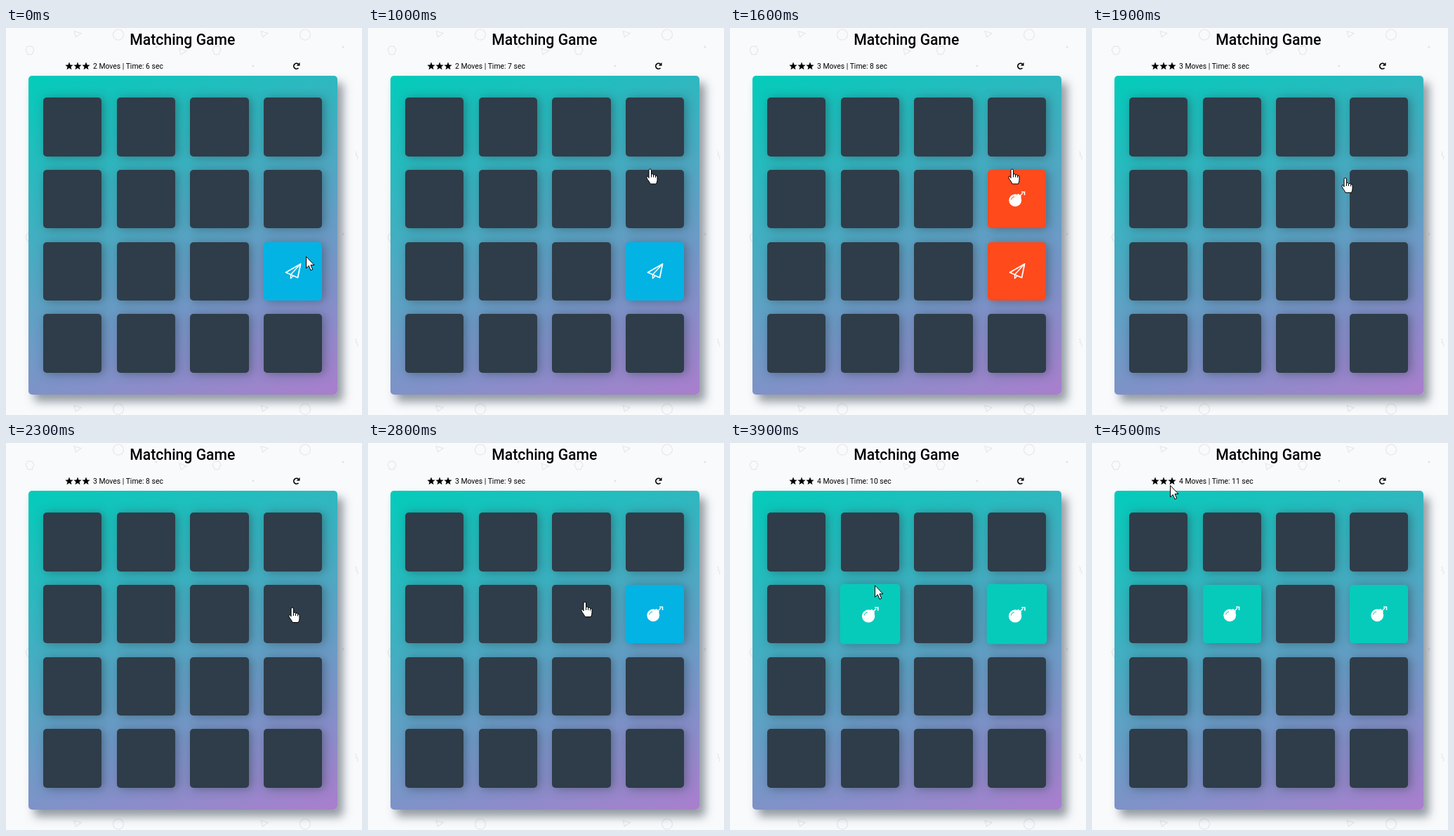
An HTML page that plays this animation: 507x551 px, repeating every 4600 ms.

```html
<!DOCTYPE html>
<html lang="en">
<head>
<meta charset="utf-8">
<title>Matching Game</title>
<style>
html, body { margin: 0; width: 100%; height: 100%; overflow: hidden; background: #f9fafc; }
body { position: relative; }
svg { position: absolute; overflow: visible; }
text { font-family: Roboto, Arial, sans-serif; }
#board {
  position: absolute; left: 32px; top: 68px; width: 440px; height: 454px; border-radius: 5px;
  background: linear-gradient(160deg, #02ccba, #aa7ecd);
  box-shadow: 8px 10px 13px rgba(46, 61, 73, .5);
}
.card {
  position: absolute; width: 83.4px; height: 83.4px; border-radius: 5px;
  background: #2e3d49; color: #2e3d49;
  box-shadow: 3.3px 1.3px 13.3px rgba(46, 61, 73, .5);
}
.card svg { left: 41.6px; top: 41.6px; width: 1px; height: 1px; visibility: hidden; }
.open svg, .match svg, .wrong svg { visibility: visible; }
.open { background: #02b3e4; color: #02b3e4; }
.match { background: #06cbbb; color: #06cbbb; }
.wrong { background: #ff4a1c; color: #ff4a1c; }
#cursor { left: 0; top: 0; width: 1px; height: 1px; fill: #fff; stroke: #000; stroke-linejoin: round; }
</style>
</head>
<body>
<svg width="507" height="551">
  <defs>
    <pattern id="doodles" width="266" height="266.5" patternUnits="userSpaceOnUse">
      <g fill="none" stroke="#e5e7eb" stroke-width="1.2">
        <path d="M97 4.5L107 7.5L99.5 13Z"/>
        <circle cx="160" cy="9.5" r="7.5"/>
        <path d="M28 31L31 26H37L40 31L37 37.5H31Z"/>
        <path d="M247 29L257 33L249 38Z"/>
        <path d="M231 176q4 2 1 5q5 2 2 6"/>
      </g>
      <g fill="#e0e3e8">
        <circle cx="214" cy="27" r="1.5"/>
        <circle cx="86" cy="54" r="1.5"/>
      </g>
    </pattern>
  </defs>
  <rect width="507" height="551" fill="url(#doodles)"/>
  <text x="251.3" y="24" font-size="21.2" font-weight="500" text-anchor="middle">Matching Game</text>
  <path id="stars"/>
  <text id="status" x="124" y="58" font-size="10.4"></text>
  <path d="M416.5 57A3.9 3.9 0 1 1 416.3 51.3" fill="none" stroke="#000" stroke-width="1.7"/>
  <path d="M418.5 49V53.7H413.8Z"/>
</svg>
<div id="board"></div>
<svg id="cursor">
  <path id="arrow" d="M.5.5V17L4.3 13.5L7 20L9.7 18.9L7 12.5H12Z"/>
  <path id="hand" d="M-2 13V2Q-2 .5-.3.5Q1.5.5 1.5 2V7.5Q4 6.5 4.5 8.5Q7 7.5 7.5 9.5Q10 9 10 11.5V16Q10 18 8.5 21.5H0Q-1 18.5-4 15Q-6 12-4.5 10.5Q-3 10-2 13ZM1.5 7.5V12M4.5 8.5V12M7.5 9.5V12.5"/>
</svg>
<script>
const $ = id => document.getElementById(id);
const LOOP = 4600, STEP = 100;

const plane = `<svg fill="none" stroke="#fff" stroke-linejoin="round">
  <path d="M10.5-10L-10.5 2L-3.5 5L6.5 9.5Z" stroke-width="1.8"/>
  <path d="M10.5-10L-3.5 5V10.5L0 7" stroke-width="1.4"/></svg>`;
const bomb = `<svg fill="none" stroke="#fff" stroke-width="1.5">
  <circle cx="-2.8" cy="2.3" r="8.9" fill="#fff" stroke="none"/>
  <path d="M0-6L2-7L6-3L5-1Z" fill="#fff" stroke="none"/>
  <path d="M4-4L8-8M6-9.500H10.500V-5"/>
  <path d="M-8.500 1.500A5.500 5.500 0 0 1-4-3" stroke="currentColor" stroke-width="1"/></svg>`;

function star(cx, cy) {
  const points = Array.from({ length: 10 }, (_, i) => {
    const r = i % 2 ? 2.6 : 5.9, a = i * Math.PI / 5;
    return [cx + r * Math.sin(a), cy - r * Math.cos(a)];
  });
  return `M${points.join('L')}Z`;
}
$('stars').setAttribute('d', [90, 102, 114].map(x => star(x, 54.5)).join(''));

const cards = Array.from({ length: 16 }, (_, i) => {
  const el = document.createElement('div');
  el.className = 'card';
  el.style.left = 21 + i % 4 * 104.67 + 'px';
  el.style.top = 31.22 + Math.floor(i / 4) * 102.65 + 'px';
  $('board').append(el);
  return el;
});

// Each look starts at the given time
const actors = [
  { el: cards[5], icon: bomb, looks: [[0, ''], [3200, 'open'], [3400, 'match']] },
  { el: cards[7], icon: bomb, looks: [[0, ''], [1200, 'open'], [1400, 'wrong'], [1800, ''], [2400, 'open'], [3400, 'match']] },
  { el: cards[11], icon: plane, looks: [[0, 'open'], [1400, 'wrong'], [1800, '']] }
];
for (const { el, icon } of actors) el.innerHTML = icon;

// Pointer hops: leave, arrive, x, y
const home = [427, 325];
const hops = [
  [400, 600, 408, 460], [600, 1000, 402, 200.5],
  [1700, 1900, 361, 213], [1900, 2300, 408, 234],
  [2500, 2800, 309, 226], [2800, 2900, 226, 230], [2900, 3000, 218, 231],
  [3700, 4000, 200, 188], [4100, 4500, 111, 60]
];

function pointer(t) {
  return hops.reduce(([px, py], [leave, arrive, x, y]) => {
    const f = Math.min(1, Math.max(0, (t - leave) / (arrive - leave)));
    return [px + (x - px) * f, py + (y - py) * f];
  }, home);
}

// Wrong pairs shake, matches pulse, other changes flip
function motion(look, age) {
  if (look === 'wrong')
    return age < 200 ? `translateX(${-6.5 * Math.cos(Math.PI * age / 100)}px)` : '';
  if (look === 'match')
    return age < 600 ? `scale(${1 + .13 * Math.sin(Math.PI * age / 600) ** 2})` : '';
  return age < 100 ? `perspective(400px) rotateY(${60 - .6 * age}deg)` : '';
}

function draw(t) {
  for (const { el, looks } of actors) {
    const [since, look] = looks.findLast(l => l[0] <= t);
    el.className = 'card ' + look;
    el.style.transform = since ? motion(look, t - since) : '';
  }

  const moves = 2 + (t >= 1200) + (t >= 3200);
  const secs = 6 + Math.floor((t + 500) / 950);
  $('status').textContent = `${moves} Moves | Time: ${secs} sec`;

  const isArrow = t < 600 || t >= 3300;
  $('arrow').style.display = isArrow ? '' : 'none';
  $('hand').style.display = isArrow ? 'none' : '';
  $('cursor').style.transform = `translate(${pointer(t).join('px,')}px)`;
}

const start = performance.now();
function frame() {
  const t = (performance.now() - start) % LOOP;
  draw(Math.floor(t / STEP) * STEP);
  requestAnimationFrame(frame);
}
frame();
</script>
</body>
</html>
```
